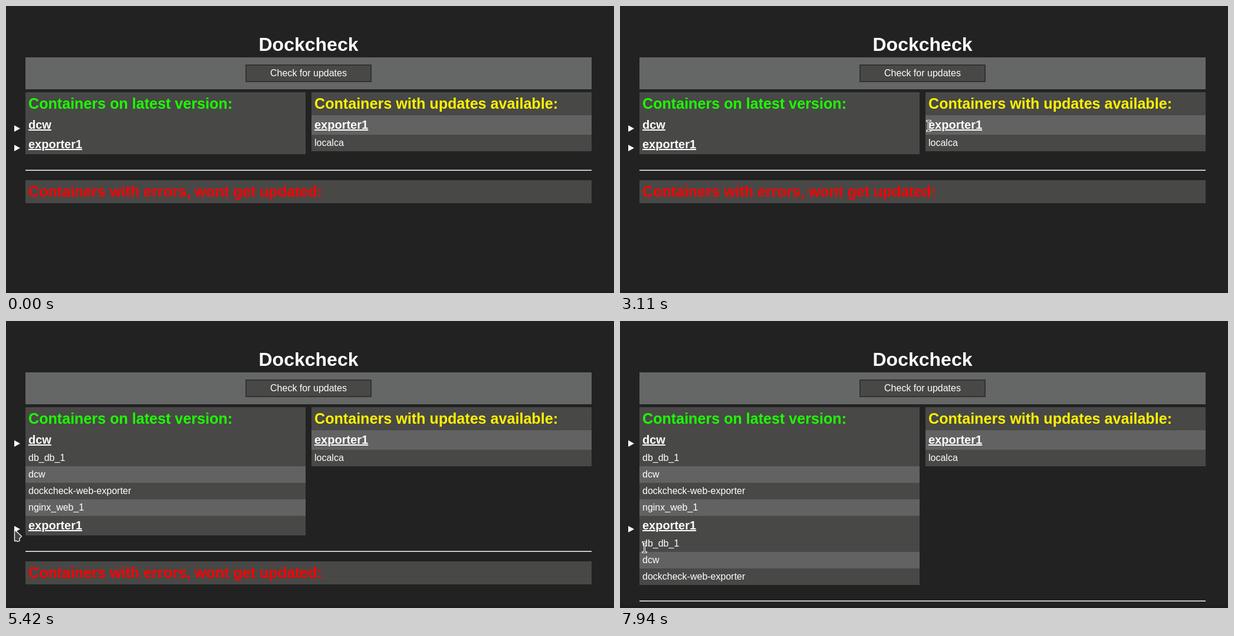
Write an HTML page that moves like this. It is 1031 px wide and 486 px high and loops after 8 s.

```html
<!DOCTYPE html>
<html lang="en">
<head>
<meta charset="utf-8">
<title>Dockcheck</title>
<style>
html, body { margin: 0; width: 100%; height: 100%; overflow: hidden; background: #222; }
body { position: relative; color: #fff; font: 16px/18px "Liberation Sans", Arial, sans-serif; }
main { position: absolute; left: 33px; top: 47px; width: 960px; }
h1 { margin: 0; height: 40px; font-size: 32px; line-height: 37px; text-align: center; }
.bar { height: 54px; padding-top: 12px; box-sizing: border-box; background: #656766; }
.button { width: 210px; margin: auto; border: 2px solid #333; background: #484846; line-height: 26px; text-align: center; }
.columns { display: flex; justify-content: space-between; align-items: flex-start; margin: 5px 0 26px; }
.panel { width: 475px; background: #484846; }
.panel div, h2, h3 { margin: 0; padding: 5px; position: relative; }
h2 { font-size: 25.12px; line-height: 29px; }
h3 { font-size: 20px; line-height: 23px; text-decoration: underline; }
.mark::before { content: ""; position: absolute; left: -19px; top: 17px; width: 10px; height: 11px; background: #fff; clip-path: polygon(0 0, 100% 50%, 0 100%); }
.panel .light { background: #626262; }
.rule { height: 1px; background: #9a9a9a; border-bottom: 1px solid #eee; margin-bottom: 16px; }
.foot { position: absolute; left: 0; right: 0; top: 482px; bottom: 0; background: #1e1e1e; }
svg { position: absolute; left: 0; top: 0; width: 100%; height: 100%; }
</style>
</head>
<body>
<div class="foot"></div>
<main>
  <h1>Dockcheck</h1>
  <div class="bar"><div class="button">Check for updates</div></div>
  <div class="columns">
    <div class="panel">
      <h2 style="color:#1cff00">Containers on latest version:</h2>
      <h3 class="mark">dcw</h3>
      <section id="first">
        <div>db_db_1</div>
        <div class="light">dcw</div>
        <div>dockcheck-web-exporter</div>
        <div class="light"><span id="nginx">nginx_web_1</span></div>
      </section>
      <h3 class="mark">exporter1</h3>
      <section id="second">
        <div><span id="db">db_db_1</span></div>
        <div class="light">dcw</div>
        <div>dockcheck-web-exporter</div>
      </section>
    </div>
    <div class="panel">
      <h2 style="color:#fff200">Containers with updates available:</h2>
      <h3 class="light"><span id="exporter">exporter1</span></h3>
      <div id="local">localca</div>
    </div>
  </div>
  <div class="rule"></div>
  <div class="panel" style="width:auto"><h2 style="color:#f00">Containers with errors, wont get updated:</h2></div>
</main>
<svg>
  <g id="cursor">
    <path id="arrow" d="M.5.5V19.500H4L6 20.500 9 19.500V15L12.500 11.500Z" fill="#444" stroke="#fff" stroke-width="1.3" stroke-linejoin="round"/>
    <g id="hand" stroke="#222">
      <path d="M-2 13V1a2 2 0 0 1 4 0V6q3-1 3 1 3-1 3 1 3-.5 3 2v6q0 3-2 6H0Q-2 20-5 14q-1.500-3 0-3.500 1-.5 3 2.500Z" fill="#fff"/>
      <path d="M2 6v5M5 7v4M8 8v3"/>
    </g>
    <g id="beam" fill="none" stroke-linecap="square">
      <path id="stem" d="M-2-8.500H3M.5-8.500V8.500M-2 8.500H3" stroke="#fff" stroke-width="3"/>
      <use href="#stem"/>
      <path d="M-2-8.500H3M.5-8.500V8.500M-2 8.500H3" stroke="#222"/>
    </g>
  </g>
</svg>
<script>
const $ = id => document.getElementById(id);
const LOOP = 8000, ENTER = 710, TICK = 66.3;

// each move eases to x, y; bend is a curve's control point, drag selects a text
const moves = [
  { at: ENTER, end: 1510, x: 628, y: 211, bend: [653, 276] },
  { at: 1570, end: 1700, x: 628, y: 205 },
  { at: 1840, end: 2500, x: 523, y: 203, drag: 'exporter' },
  { at: 3100, end: 3820, x: 10, y: 206, bend: [200, 345] },
  { at: 4300, end: 4420, x: 14, y: 209 },
  { at: 4690, end: 5540, x: 14, y: 356, bend: [6, 290] },
  { at: 6020, end: 6280, x: 37, y: 317 },
  { at: 6280, end: 6740, x: 183, y: 318, drag: 'nginx' },
  { at: 6940, end: 7140, x: 102, y: 377 },
  { at: 7140, end: 7460, x: 33, y: 385, drag: 'db' },
  { at: 7735, end: 7930, x: 41, y: 383 }
];
const drags = moves.filter(m => m.drag);

moves.forEach((m, i) => {
  m.from = moves[i - 1] || { x: 827, y: 470 };
  m.next = moves[i + 1] ? moves[i + 1].at : LOOP;
  m.bend ||= [(m.from.x + m.x) / 2, (m.from.y + m.y) / 2];
});

const curve = (a, b, c, u) => Math.round((1 - u) ** 2 * a + 2 * u * (1 - u) * b + u * u * c);

function pointer(t) {
  const m = moves.findLast(m => t >= m.at) || moves[0];
  const u = 1 - (1 - Math.min(1, (t - m.at) / (m.end - m.at))) ** 2;
  return { x: curve(m.from.x, m.bend[0], m.x, u), y: curve(m.from.y, m.bend[1], m.y, u) };
}

function over(id, { x, y }, above = 0) {
  const r = $(id).getBoundingClientRect();
  return x >= r.left - 1 && x <= r.right && y > r.top - above && y < r.bottom;
}

function draw(t) {
  $('first').hidden = t < 4700;
  $('second').hidden = t < 5690;
  $('cursor').style.display = t < ENTER ? 'none' : '';

  const p = pointer(ENTER + Math.max(0, Math.floor((t - ENTER) / TICK)) * TICK);
  const kind = drags.some(m => over(m.drag, p)) ? 'beam' : over('local', p, 6) ? 'hand' : 'arrow';
  $('cursor').setAttribute('transform', `translate(${p.x} ${p.y})`);
  for (const id of ['arrow', 'hand', 'beam']) $(id).style.display = id === kind ? '' : 'none';

  for (const { drag, at, next, from } of drags) {
    const el = $(drag), left = el.getBoundingClientRect().left;
    const a = Math.min(from.x, p.x) - left, b = Math.max(from.x, p.x) - left;
    el.style.background = t >= at && t < next
      ? `linear-gradient(90deg, #0000 ${a}px, #116cd6 ${a}px ${b}px, #0000 ${b}px)` : 'none';
  }
}

function frame() {
  draw(performance.now() % LOOP);
  requestAnimationFrame(frame);
}
frame();
</script>
</body>
</html>
```
